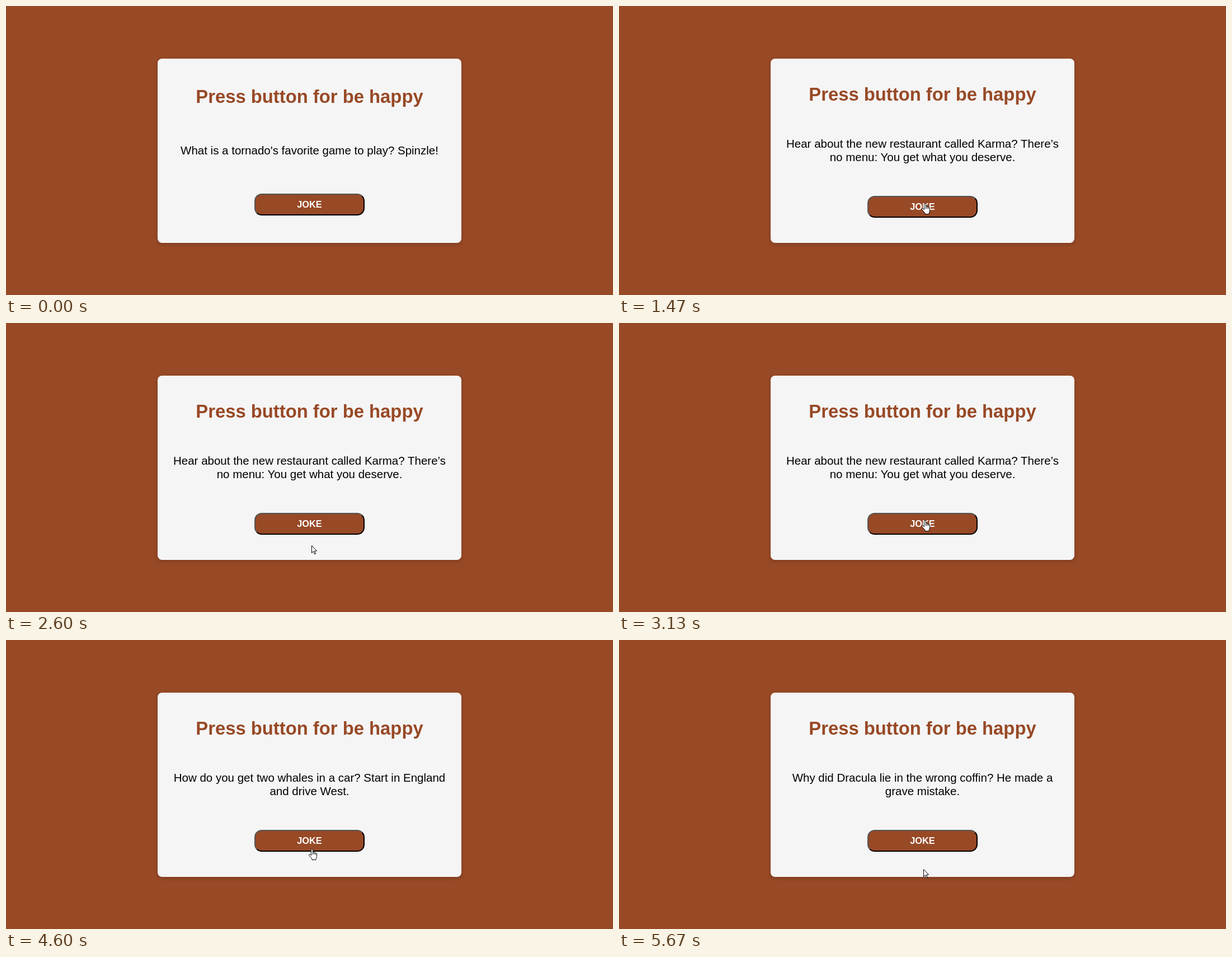
These frames come from a looping animation (1085 by 516 pixels, 6540 ms). An HTML page:

```html
<!DOCTYPE html>
<html lang="en">
<head>
<meta charset="utf-8">
<title>Joke button</title>
<style>
  html, body { margin: 0; width: 100%; height: 100%; overflow: hidden; }
  body {
    position: relative;
    background: #984926;
    font: 16.4px "Liberation Sans", Arial, Helvetica, sans-serif;
    text-align: center;
    cursor: default;
  }
  .card {
    position: absolute; left: 271px; top: 94px; width: 543px; height: 329px;
    border-radius: 8px;
    background: #f5f5f5;
    box-shadow: 0 2px 6px rgba(0, 0, 0, .2);
  }
  h1, p, .button { position: absolute; margin: 0; box-sizing: border-box; }
  h1, p { left: 0; width: 100%; }
  h1 { top: 49px; font-size: 2em; line-height: 37px; color: #984926; }
  p { top: 152px; font-size: 1.25em; line-height: 24px; white-space: pre; color: #000; }
  .button {
    left: 173px; top: 241px; width: 197px; height: 39px;
    border: 2px solid; border-color: #545454 #000 #000 #545454;
    border-radius: 13px;
    background: #984926; color: #fff;
    font-weight: bold; line-height: 35px;
  }
  .pressed { border-color: #000 #545454 #545454 #000; }
  .tall h1 { top: 45px; }
  .tall p { top: 140px; }
  .tall .button { top: 245px; }
  svg { position: absolute; left: 0; top: 0; width: 24px; height: 24px; overflow: visible; }
  svg path { fill: #fff; stroke: #000; stroke-width: 1; stroke-linejoin: round; }
  svg .crease { fill: none; }
</style>
</head>
<body>
<div class="card" id="card">
  <h1>Press button for be happy</h1>
  <p id="joke"></p>
  <div class="button" id="button">JOKE</div>
</div>
<svg id="pointer">
  <path id="arrow" d="M.5 .5V13.5L3.5 10.7 5.7 15.8 7.7 15 5.5 10H9.5Z"/>
  <g id="hand" transform="translate(-5 0)">
    <path d="M4.5 11.5V2c0-2 3-2 3 0v4.5c0-1.4 2.6-1.4 2.6 .3v.4c.2-1 2.4-.9 2.4 .6v.5c.3-1 2-.7 2 .7v4.5c0 2-1.5 3-1.5 5v1H6v-1.2C6 16.5 1.5 13.5 .6 11.4c-.5-1.4 1-2.4 2.2-1.3Z"/>
    <path class="crease" d="M7.5 6.5V10M10.1 7V10M12.5 8V10.3"/>
  </g>
</svg>
<script>
// The picture advances in ticks, 15 a second
const LOOP = 6540, TICK = 1000 / 15;
const $ = id => document.getElementById(id);
const smooth = f => f * f * (3 - 2 * f);
const easeOut = f => 1 - (1 - f) ** 3;

const jokes = [
  { from: 0, text: "What is a tornado's favorite game to play? Spinzle!" },
  { from: 22, text: "Hear about the new restaurant called Karma? There’s\nno menu: You get what you deserve." },
  { from: 49, text: "How do you get two whales in a car? Start in England\nand drive West." },
  { from: 81, text: "Why did Dracula lie in the wrong coffin? He made a\ngrave mistake." }
];

// The pointer enters here, then swings between the button and the card's foot
const entry = { x: 622, y: 489 };
const moves = [
  { from: 3, to: 8, x: 543, y: 358, ease: easeOut },
  { from: 9, to: 13, x: 546, y: 352, ease: smooth },
  { from: 25, to: 31, x: 546, y: 432, ease: smooth },
  { from: 34, to: 45, x: 546, y: 352, ease: smooth },
  { from: 50, to: 60, x: 545, y: 432, ease: smooth },
  { from: 63, to: 76, x: 546, y: 362, ease: easeOut },
  { from: 80, to: 85, x: 544, y: 409, ease: smooth }
];
const presses = [{ from: 45, to: 47 }, { from: 76, to: 78 }];

function pointerAt(tick) {
  let { x, y } = entry;
  for (const m of moves) {
    const f = m.ease(Math.min(1, Math.max(0, (tick - m.from) / (m.to - m.from))));
    x += (m.x - x) * f;
    y += (m.y - y) * f;
  }
  return { x: Math.round(x), y: Math.round(y) };
}

function show(id, on) {
  $(id).style.display = on ? "" : "none";
}

function draw(tick) {
  const { text } = jokes.findLast(j => j.from <= tick);
  const tall = text.includes("\n");
  $("joke").textContent = text;
  $("card").classList.toggle("tall", tall);
  $("button").classList.toggle("pressed", presses.some(p => tick >= p.from && tick < p.to));

  const { x, y } = pointerAt(tick);
  const over = y < (tall ? 378 : 374);
  $("pointer").style.transform = `translate(${x}px, ${y}px)`;
  show("pointer", tick >= moves[0].from);
  show("hand", over);
  show("arrow", !over);
}

let shown = -1;

function run() {
  // The small lead absorbs times rounded to 10 ms
  const tick = Math.floor((performance.now() % LOOP + 4) / TICK);
  if (tick !== shown) draw(shown = tick);
  requestAnimationFrame(run);
}
run();
</script>
</body>
</html>
```
